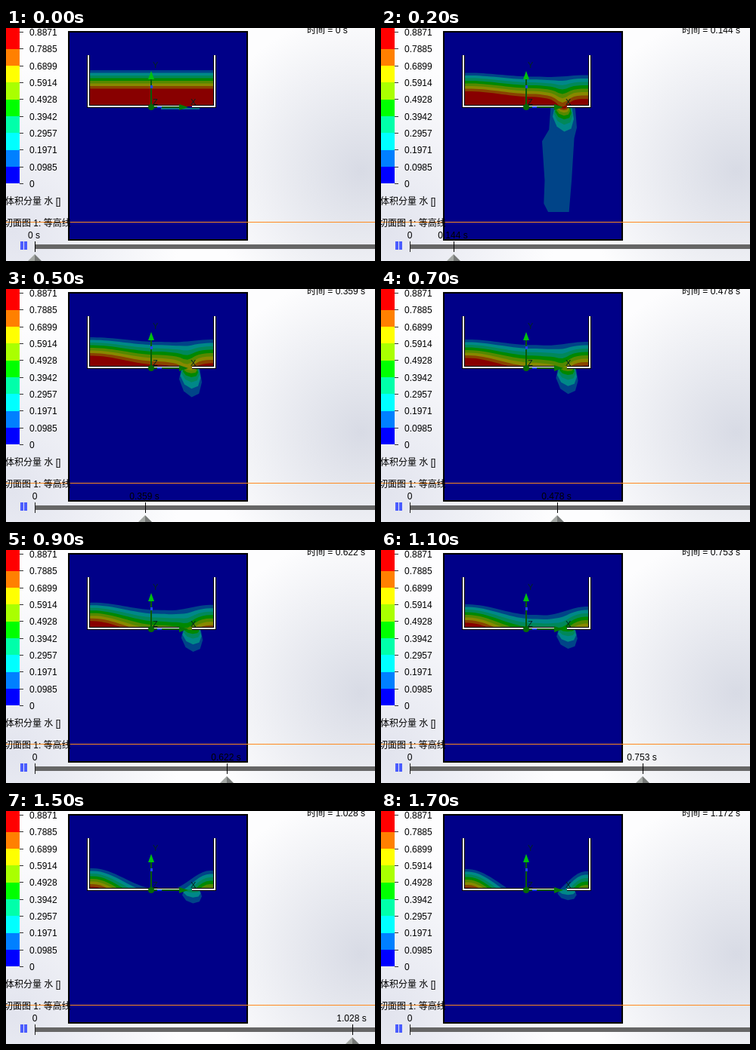
An HTML page with a canvas for the animation above (1.8 s loop, 488x309 px).

```html
<!DOCTYPE html>
<html lang="zh">
<head>
<meta charset="utf-8">
<style>
  html, body { margin: 0; overflow: hidden; }
  canvas { display: block; }
</style>
</head>
<body>
<canvas id="stage" width="488" height="309"></canvas>
<script>
const g = document.getElementById('stage').getContext('2d');
const STEP = 100, STEPS = 18, FLOOR = 104;
const LEFT = 110, RIGHT = 275, HOLE = [229, 246];
const LEGEND = ['#f00', '#ff8000', '#ff0', '#af0', '#0f0', '#0fa', '#0ff', '#0080ff', '#00f'];
// Shaded contour colours, from thin spray to full water
const BANDS = ['#004488', '#008888', '#00885a', '#008800', '#558800', '#888800', '#884400', '#880000'];

// Unit outlines below the opening: x from -1 to 1, y from 0 to 1
const DROP = [[-.8, 0], [-1, .4], [-.6, .8], [.1, 1], [.75, .88], [1, .5], [.8, 0]];
const COLUMN = [[-.5, 0], [-.6, .22], [-1, .33], [-.85, .7], [-.9, .92], [-.65, 1],
                [.55, 1], [.7, .7], [.85, .3], [1, .2], [.9, 0]];

const smooth = (a, b, x) => {
  const u = Math.min(1, Math.max(0, (x - a) / (b - a)));
  return u * u * (3 - 2 * u);
};

function rect(x, y, w, h, color) {
  g.fillStyle = color;
  g.fillRect(x, y, w, h);
}

function trace(points) {
  g.beginPath();
  for (const [x, y] of points) g.lineTo(x, y);
}

function poly(points, color) {
  trace(points);
  g.fillStyle = color;
  g.fill();
}

function line(points, color, width) {
  trace(points);
  g.strokeStyle = color;
  g.lineWidth = width;
  g.stroke();
}

function text(s, x, y, align = 'left', color = '#000', size = 12) {
  g.font = size + 'px "Liberation Sans", "Noto Sans CJK SC", sans-serif';
  g.textAlign = align;
  g.fillStyle = color;
  g.fillText(s, x, y);
}

function glow(x, y, radius, rgb) {
  const shade = g.createRadialGradient(x, y, 0, x, y, radius);
  shade.addColorStop(0, `rgb(${rgb})`);
  shade.addColorStop(1, `rgba(${rgb}, 0)`);
  rect(0, 0, 488, 309, shade);
}

function drawBackground() {
  rect(0, 0, 488, 309, '#fdfdfe');
  glow(470, 190, 210, '216, 219, 229');
  glow(10, 270, 220, '226, 228, 238');
}

function drawLegend() {
  const top = i => i ? Math.round(5.5 + i * 22.3) : 0;
  LEGEND.forEach((c, i) => rect(0, top(i), 18, top(i + 1) - top(i), c));
  for (let i = 0; i < 10; i++) {
    const y = Math.round(5 + i * 22.35);
    const value = Math.floor((9 - i) * 985.7) / 10000;
    rect(18, y, 5, 1, '#333');
    text(value ? value.toFixed(4) : '0', 31, y + 5);
  }
}

// Height of contour i: the level sinks, hollows in the middle and funnels into the opening
function surface(i, x, n) {
  const q = i / 7, t = n / 17, open = Math.min(1, n / 2);
  const sink = 21 * (1 - (1 - t) ** 1.4);
  const tilt = (3 + 7 * q) * open * smooth(200, 265, x);
  const hollow = (5 * open + 33 * t ** 3 + 20 * q * t) * smooth(115, 200, x) * (1 - smooth(215, 270, x));
  const funnel = 10 * q * open * Math.exp(-(((x - 240) / 10) ** 2));
  return 56 + 3.5 * i + sink + tilt + hollow + funnel;
}

function spill(outline, x, halfWidth, depth, color) {
  if (depth > 1) poly(outline.map(([u, v]) => [x + u * halfWidth, FLOOR + v * depth]), color);
}

function drawWater(n) {
  const open = Math.min(1, n / 2);
  // The first gush falls freely, then breaks up
  spill(COLUMN, 236, 23, Math.min(35 * n * n, 240 - 50 * n), BANDS[0]);
  BANDS.forEach((color, i) => {
    const depth = open * ((50 - 2.1 * n) * .74 ** i - .2 * i * n);
    spill(DROP, Math.min(246, 239 + n), 16 - 1.6 * i - .2 * n, depth, color);
  });

  g.save();
  g.beginPath();
  g.rect(LEFT, 36, RIGHT - LEFT, FLOOR - 36);
  g.clip();
  BANDS.forEach((color, i) => {
    const points = [[LEFT, 200]];
    for (let x = LEFT; x <= RIGHT; x += 5) points.push([x, surface(i, x, n)]);
    poly([...points, [RIGHT, 200]], color);
  });
  g.restore();
}

function drawTank() {
  const sides = [
    [[109, 36], [109, FLOOR], [HOLE[0], FLOOR]],
    [[HOLE[1], FLOOR], [276, FLOOR], [276, 36]]
  ];
  for (const side of sides) {
    line(side, '#000', 4);
    line(side, '#fff', 2);
  }
}

function drawAxes(n) {
  if (!n) rect(205, 106, 51, 2, '#08708a');
  rect(191, 66, 2, 39, '#085c08');
  rect(192, 104, 40, 2, '#085c08');
  poly([[192, 57], [196, 68], [188, 68]], '#00c010');
  poly([[241, 105], [229, 101], [229, 109]], '#067806');
  rect(191, 76, 3, 4, '#2244ee');
  rect(200, 104, 6, 2, '#2244ee');
  g.beginPath();
  g.arc(192, 105, 4, 0, 7);
  g.fillStyle = '#076807';
  g.fill();
  text('Y', 194, 53, 'left', '#032420', 11);
  text('Z', 194, 102, 'left', '#032420', 11);
  text('X', 244, 102, 'left', '#032420', 11);
}

function drawTimeline(n, seconds, label) {
  const x = Math.floor(38 + seconds * 409);
  rect(19, 283, 4, 11, '#4a5cff');
  rect(24, 283, 4, 11, '#4a5cff');
  rect(38, 287, 450, 6, '#666');
  rect(38, 283, 1, 14, '#222');
  rect(x, 283, 1, 14, '#000');
  poly([[x, 300], [x - 9, 309], [x, 309]], '#a4a8a4');
  poly([[x, 300], [x, 309], [x + 9, 309]], '#777a78');
  if (n) text('0', 38, 279, 'center');
  text(label, x - 1, 279, 'center');
}

function draw(n) {
  const ticks = n < 6 ? n * 6 : Math.round(n * 5.765);
  const seconds = ticks * 1.172 / 98;
  const label = (n ? seconds.toFixed(3) : '0') + ' s';
  drawBackground();
  drawLegend();
  rect(82, 4, 238, 278, '#000');
  rect(84, 6, 234, 274, '#000088');
  drawWater(n);
  drawTank();
  drawAxes(n);
  rect(0, 257, 488, 1, '#ff8a1e');
  text('体积分量 水 []', -1, 234);
  text('切面图 1: 等高线', -3, 263);
  text('时间 = ' + label, 398, 7);
  drawTimeline(n, seconds, label);
}

function tick() {
  draw(Math.floor(performance.now() / STEP) % STEPS);
  requestAnimationFrame(tick);
}
tick();
</script>
</body>
</html>
```
